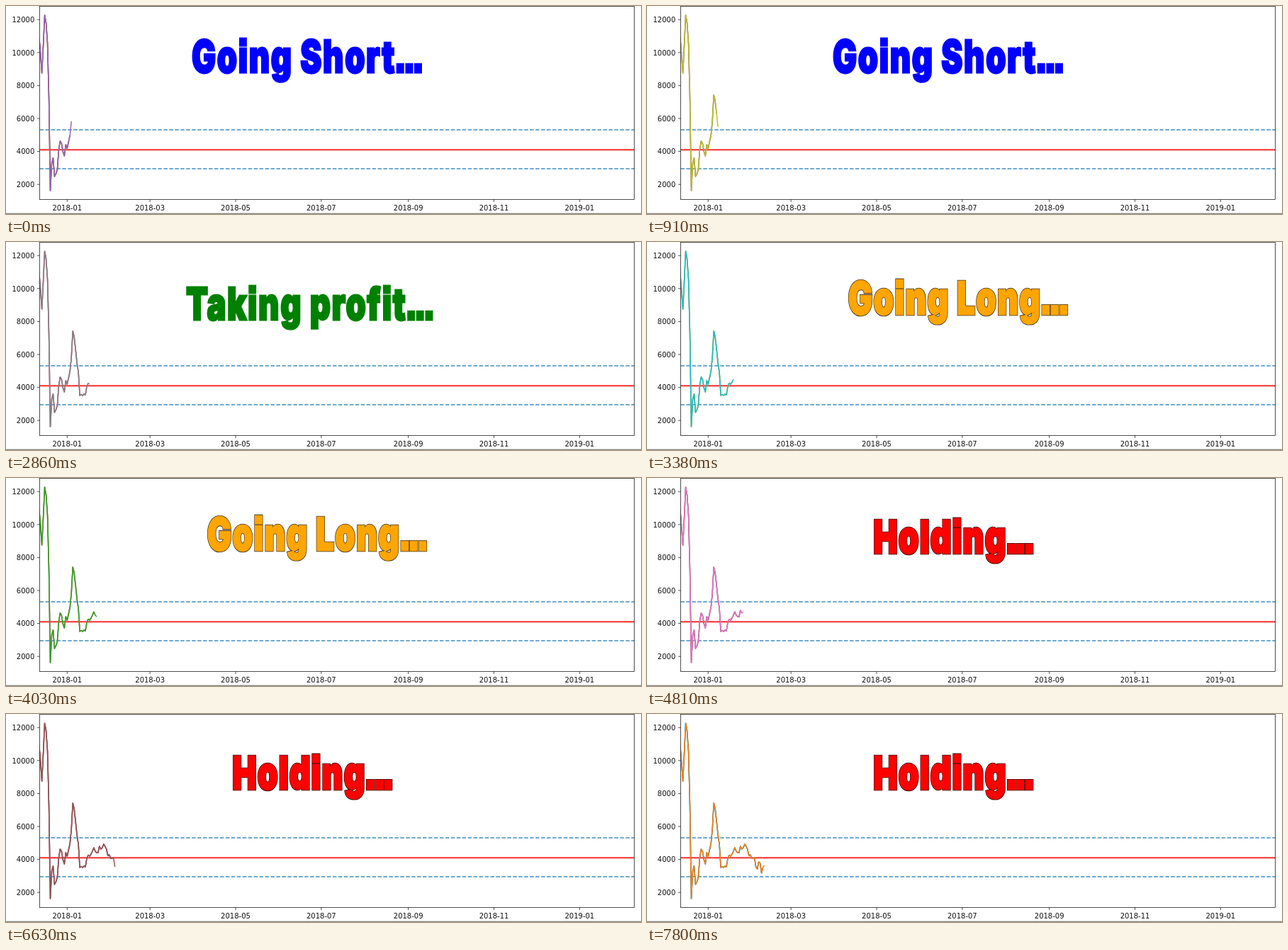
Animation, 896 px wide and 294 px high, one loop 8 s. Source, as an HTML page:

```html
<!DOCTYPE html>
<html lang="en">
<head>
<meta charset="utf-8">
<title>Price chart with trading signals</title>
<style>
  html, body { margin: 0; width: 100%; height: 100%; overflow: hidden; background: #fff; }
  svg { display: block; width: 896px; height: 294px; }
  .label { font: 10px "DejaVu Sans", sans-serif; fill: #111; }
  .signal {
    font: 900 63px Inter, "Open Sans", sans-serif;
    font-feature-settings: "ss07";
    letter-spacing: 2.2px;
    stroke-linejoin: miter;
    stroke-miterlimit: 3;
  }
  .dots { letter-spacing: -6px; }
</style>
</head>
<body>
<svg id="stage" viewBox="0 0 896 294"></svg>
<script>
const LOOP = 8000, TICK = 130;
const LEFT = 47.5, RIGHT = 886.5, TOP = 0.5, BOTTOM = 273.5;
const DAY = 1.981, JAN = 86.3;

const COLORS = ['#1f77b4', '#ff7f0e', '#2ca02c', '#d62728', '#9467bd',
                '#8c564b', '#e377c2', '#7f7f7f', '#bcbd22', '#17becf'];

// Daily price as stage heights, first entry 20 days before January 1
const PRICES = [
  44, 67, 95, 55, 13, 24, 53, 130, 261, 222, 215, 241, 237, 231, 203, 191, 194, 206, 212, 196,
  201, 192, 183, 163, 126, 134, 152, 171, 184, 217, 215.5, 217, 215, 216, 204, 199.5, 201,
  198, 194, 189, 194, 196, 196, 187, 191, 189, 184, 187, 191, 200, 199, 204, 204, 203, 216,
  219, 209, 211, 225, 217, 214
];
const FIRST = 24, FIRST_COLOR = 14;

// Ticks to wait before each new day is drawn
const WAITS = '2212221122' + '30222' + '2121122121' + '122212211221';

const SIGNALS = [
  { at: 0,  text: 'Going Short',   x: 262, y: 94,      fill: '#0000ff' },
  { at: 11, text: 'Taking profit', x: 254, y: 110,     fill: '#008000' },
  { at: 25, text: 'Going Long',    x: 284, y: 102,     fill: '#ffa500', edge: '#3d3220' },
  { at: 37, text: 'Holding',       x: 319.5, y: 105.5, fill: '#ff0000', edge: '#300' }
];

const stage = document.getElementById('stage');

function add(tag, attrs, text = '', parent = stage) {
  const el = document.createElementNS('http://www.w3.org/2000/svg', tag);
  for (const key in attrs) el.setAttribute(key, attrs[key]);
  el.textContent = text;
  return parent.appendChild(el);
}

function line(x1, y1, x2, y2, stroke, width, dash = 'none') {
  add('line', { x1, y1, x2, y2, stroke, 'stroke-width': width, 'stroke-dasharray': dash });
}

const frame = { x: LEFT, y: TOP, width: RIGHT - LEFT, height: BOTTOM - TOP };
const clip = add('clipPath', { id: 'plot' });
add('rect', frame, '', clip);

// Reference levels
for (const y of [175, 230]) line(LEFT, y, RIGHT, y, '#3f90c4', 1.7, '5.55 2.4');
line(LEFT, 203.2, RIGHT, 203.2, '#fb2c2c', 1.9);

// Each day is plotted over the previous ones, whose colours show at the edges
const plots = [2, 1, 0].map(age => ({
  age,
  el: add('polyline', {
    fill: 'none', 'stroke-width': 1.5, 'stroke-linejoin': 'round', 'clip-path': 'url(#plot)'
  })
}));

// Axes
add('rect', { ...frame, fill: 'none', stroke: '#222', 'stroke-width': 0.8 });
for (let value = 2000; value <= 12000; value += 2000) {
  const y = 298.8 - value * 0.0233;
  line(44, y, LEFT, y, '#222', 0.8);
  add('text', { class: 'label', x: 40.3, y: y + 3.7, 'text-anchor': 'end' }, value);
}
const start = Date.UTC(2018, 0, 1);
for (let month = 0; month <= 12; month += 2) {
  const date = new Date(Date.UTC(2018, month, 1));
  const x = JAN + (date - start) / 864e5 * DAY;
  line(x, BOTTOM, x, BOTTOM + 3.5, '#222', 0.8);
  add('text', { class: 'label', x, y: 288.6, 'text-anchor': 'middle' },
      date.toISOString().slice(0, 7));
}
line(0, 293.3, 896, 293.3, '#666', 1);

// Condensed heavy lettering, with a dark edge where given
function letter(s, stroke, width) {
  const el = add('text', {
    class: 'signal', transform: `translate(${s.x} ${s.y}) scale(.72 1)`,
    fill: s.fill, stroke, 'stroke-width': width
  }, s.text);
  add('tspan', { class: 'dots', dx: -3 }, '...', el);
  return el;
}
for (const s of SIGNALS) {
  s.layers = s.edge ? [letter(s, s.edge, 4.6)] : [];
  s.layers.push(letter(s, s.fill, 2.8));
}

let sum = 0;
const stepTicks = [...WAITS].map(wait => sum += +wait);
const points = PRICES.map((y, i) => `${(JAN + (i - 20) * DAY).toFixed(2)},${y}`);

function draw() {
  const tick = Math.floor(performance.now() % LOOP / TICK);
  const today = stepTicks.filter(at => at <= tick).length;
  for (const { age, el } of plots) {
    const day = today - age;
    el.setAttribute('points', points.slice(0, FIRST + day).join(' '));
    el.setAttribute('stroke', COLORS[(FIRST_COLOR + day) % COLORS.length]);
  }

  const current = SIGNALS.filter(s => s.at <= tick).pop();
  for (const s of SIGNALS) {
    for (const el of s.layers) el.style.display = s === current ? '' : 'none';
  }
  requestAnimationFrame(draw);
}
draw();
</script>
</body>
</html>
```
